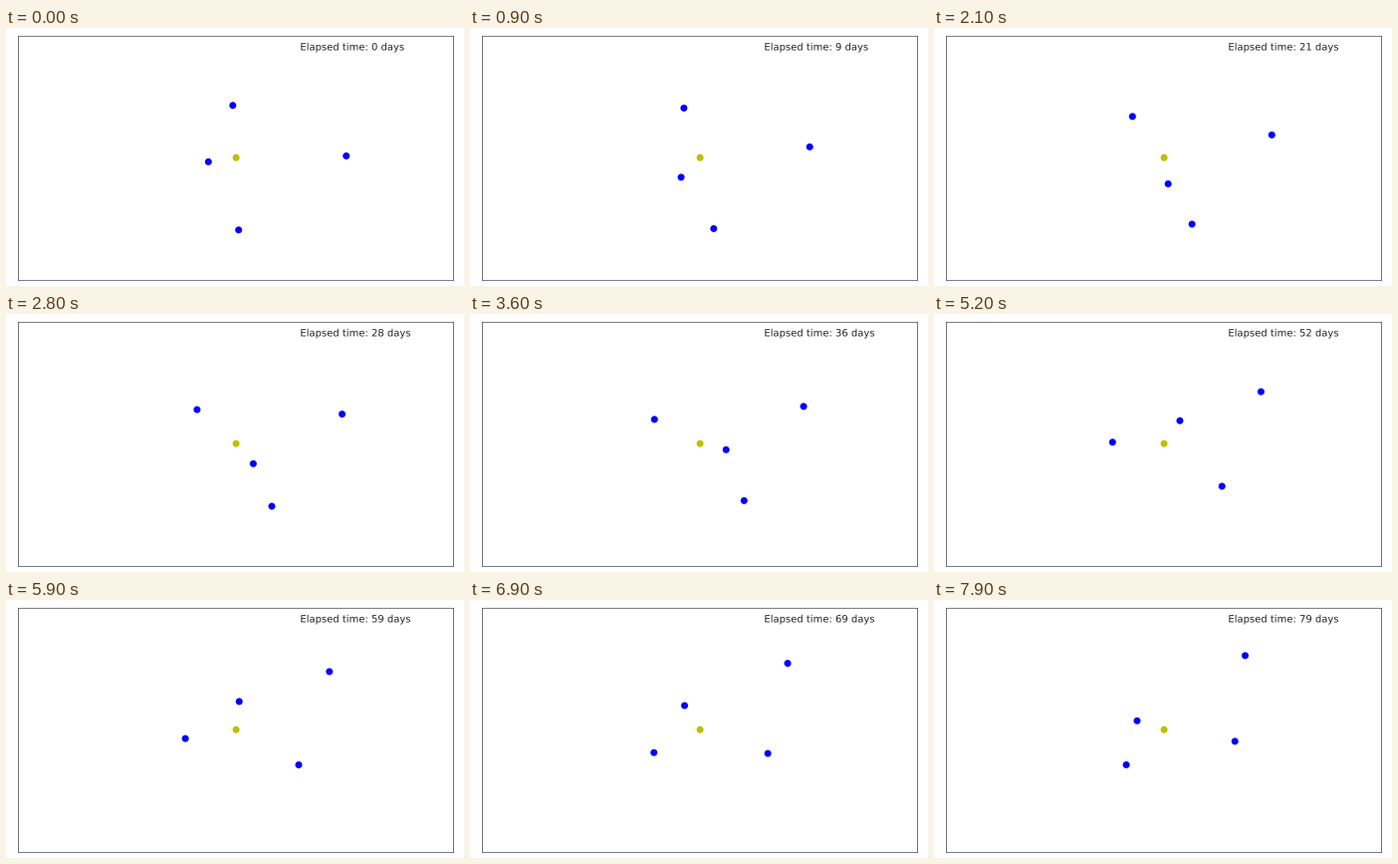
Write a matplotlib script that moves like this. It is 460 px wide and 259 px high and loops after 8000 ms.

```python
import numpy as np
import matplotlib.pyplot as plt
from matplotlib.animation import FuncAnimation
from matplotlib.patches import Circle, PathPatch
from matplotlib.textpath import TextPath
from matplotlib.transforms import Affine2D

W, H, DPI = 460, 259, 72
LEFT, RIGHT, TOP, BOTTOM = 12.58, 449.58, 8.27, 253.3
SUN_X, SUN_Y = 231.1, 130.15
DAYS = 80
DAY = 86400.0
GM = 6.674e-11 * 1.989e30
PIXEL = 9e11 / (RIGHT - LEFT)  # metres per pixel

# distance (m), speed (m/s), starting angle (degrees)
PLANETS = [
    (57.9e9, 47.4e3, 188.5),
    (108.2e9, 35.0e3, 93.6),
    (149.6e9, 29.8e3, -88.0),
    (227.9e9, 24.1e3, 0.9),
]


def orbit(dist, speed, angle):
    """Daily positions around the sun, by semi-implicit Euler steps."""
    a = np.radians(angle)
    pos = dist * np.array([np.cos(a), np.sin(a)])
    vel = speed * np.array([-np.sin(a), np.cos(a)])
    path = [pos]
    for _ in range(DAYS - 1):
        vel = vel - GM * pos / np.hypot(*pos) ** 3 * DAY
        pos = pos + vel * DAY
        path.append(pos)
    return path


fig = plt.figure(figsize=(W / DPI, H / DPI), dpi=DPI, facecolor="white")
ax = fig.add_axes([LEFT / W, 1 - BOTTOM / H, (RIGHT - LEFT) / W, (BOTTOM - TOP) / H])
ax.set(xlim=((LEFT - SUN_X) * PIXEL, (RIGHT - SUN_X) * PIXEL),
       ylim=((SUN_Y - BOTTOM) * PIXEL, (SUN_Y - TOP) * PIXEL),
       xticks=[], yticks=[])
for spine in ax.spines.values():
    spine.set(snap=False, linewidth=0.72, edgecolor="0.25")


def dot(color):
    return ax.add_patch(Circle((0, 0), 3.5 * PIXEL, fc=color, lw=0))


def text_path(day):
    return TextPath((295.4, H - 22.4), f"Elapsed time: {day} days", size=10,
                    prop={"family": "DejaVu Sans"})


sun = dot("y")
orbits = [orbit(*p) for p in PLANETS]
dots = [dot("b") for _ in PLANETS]
# drawn as outlines in pixel units, for sub-pixel placing
label = PathPatch(text_path(0), fc="0.15", lw=0, snap=False)
label.set_transform(Affine2D().scale(1 / W, 1 / H) + fig.transFigure)
fig.add_artist(label)


def update(day):
    for d, path in zip(dots, orbits):
        d.center = path[day]
    label.set_path(text_path(day))
    return [*dots, label]


anim = FuncAnimation(fig, update, frames=DAYS, interval=100, repeat=True,
                     repeat_delay=0)
plt.show()
```
